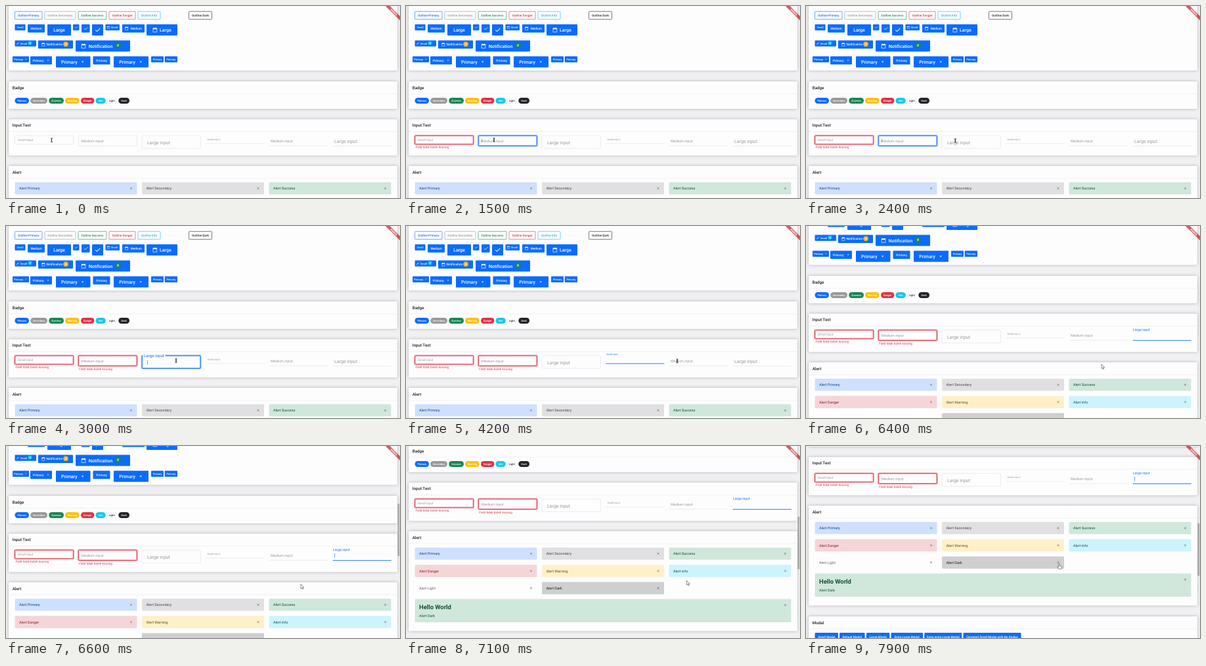
Animation of 600x293 px, one loop 8000 ms. Source, as an HTML page:

```html
<!DOCTYPE html>
<html lang="en">
<head>
<meta charset="utf-8">
<title>Component gallery</title>
<style>
html, body { margin: 0; width: 100%; height: 100%; overflow: hidden; background: #f0eff1; }
svg { display: block; width: 600px; height: 293px; font-family: Roboto, Arial, sans-serif; text-rendering: geometricPrecision; }
.card { fill: #fefdfe; filter: drop-shadow(0 0 2.2px rgba(0, 0, 0, .27)); }
</style>
</head>
<body>
<svg viewBox="0 0 600 293">
  <g id="page">
    <g id="top"></g>
    <g id="inputs"></g>
    <g id="below"></g>
  </g>
  <rect id="thumb" x="596.3" width="3" height="80" fill="#8c8c8c"/>
  <g transform="translate(600 0) rotate(45)">
    <rect x="-20" y="10.9" width="40" height="4.7" fill="#b71c1c" opacity=".7"/>
    <text y="14.7" font-size="4" font-weight="900" fill="#fff" text-anchor="middle">DEBUG</text>
  </g>
  <g id="pointer"></g>
</svg>
<script>
const $ = id => document.getElementById(id);
const BLUE = '#0a6cff', RED = '#dc3545', GREEN = '#198754';
const S = 3.9, M = 4.69, B = 5.47, L = 7.03; // font sizes

const text = (x, y, s, size, fill, extra = '') =>
  `<text x="${x}" y="${y}" font-size="${size}" fill="${fill}" ${extra}>${s}</text>`;
const rect = (x, y, w, h, fill, r = 1, extra = '') =>
  `<rect x="${x}" y="${y}" width="${w}" height="${h}" rx="${r}" fill="${fill}" ${extra}/>`;
const path = (d, stroke, width, extra = '') =>
  `<path d="${d}" fill="none" stroke="${stroke}" stroke-width="${width}" ${extra}/>`;
const MID = 'text-anchor="middle" font-weight="500"';

function card(y, h, title) {
  return `<rect class="card" x="4" y="${y}" width="592" height="${h}" rx="1.5"/>` + (title ?
    text(9.7, y + 11.5, title, 6.25, '#222', 'font-weight="500"') +
    path(`M4 ${y + 19}H596`, '#e2e1e3', .5) : '');
}

// Filled button; height follows the font size
const heights = { [S]: 9.3, [M]: 12.5, [L]: 17 };
function button(x0, x1, y, size, label, textX) {
  const h = heights[size], base = y + h / 2 + size * .36;
  return rect(x0, y, x1 - x0, h, BLUE) + (textX
    ? text(textX, base, label, size, '#fff', 'font-weight="500"')
    : text((x0 + x1) / 2, base, label, size, '#fff', MID));
}

const at = (x, y, k, body) => `<g transform="translate(${x} ${y}) scale(${k})">${body}</g>`;
const calendar = (x, y, k) => at(x, y, k,
  path('M-2.5-2h5V3h-5zM-1.5-3v1M1.5-3v1', '#fff', .6) + rect(-2.5, -2.2, 5, 1.4, '#fff', 0));
const check = (x, y, k) => at(x, y, k, path('M-2.6 0L-.8 1.8L2.8-1.8', '#fff', .8));
const pencil = (x, y) => path(`M${x - 1.5} ${y + 1.5}l3-3`, '#fff', 1);
const caretDown = (x, y, k) => at(x, y, k, '<path d="M-1.4-.7h2.8L0 .7z" fill="#fff"/>');
const dot = (x, y, r, fill) =>
  `<circle cx="${x}" cy="${y}" r="${r}" fill="${fill}"/>` + text(x, y + r * .4, '4', r * 1.2, '#fff', MID);

function buildTop() {
  let s = card(-20, 118.5);
  [['Primary', 13.5, 55, BLUE], ['Secondary', 59, 106, '#999'], ['Success', 110, 153, GREEN],
   ['Danger', 157, 197, RED], ['Info', 201, 235, '#17b8e8'], ['Light', 240, 273, '#f7f6f8'],
   ['Dark', 278.5, 313.5, '#212529']].forEach(([name, a, b, c]) => {
    s += rect(a, 8.3, b - a, 12, 'none', 1, `stroke="${c}" stroke-width=".6"`) +
      text((a + b) / 2, 16, 'Outline ' + name, M, c, MID);
  });
  s += button(13.5, 29.5, 28, S, 'Small') + button(33, 59, 28, M, 'Medium') + button(63, 99, 28, L, 'Large') +
    button(102, 111.5, 28, S, '') + check(106.8, 32.7, .75) +
    button(115, 127.6, 28, M, '') + check(121.3, 34.3, 1) +
    button(131, 148, 28, L, '') + check(139.5, 36.5, 1.3) +
    button(151.5, 173, 28, S, 'Small', 160) + calendar(156, 32.6, .65) +
    button(177, 211, 28, M, 'Medium', 189.7) + calendar(183.6, 34, .85) +
    button(214, 261, 28, L, 'Large', 234) + calendar(226.8, 36.3, 1.15);
  s += button(13.5, 46, 52.5, S, 'Small', 22) + pencil(18, 57.3) + dot(36.5, 56.5, 3, '#17c6f2') +
    button(49, 102, 52.5, M, 'Notification', 61.5) + calendar(56.8, 58.6, .85) + dot(91, 58.3, 3.8, '#ffb91a') +
    button(106, 189, 52.5, L, 'Notification', 125.7) + calendar(118, 60.8, 1.15) + dot(170.3, 60, 4.7, GREEN);
  s += button(10, 35, 76.8, S, 'Primary', 12.3) + caretDown(30.3, 81.3, .8) +
    button(37, 70, 76.8, M, 'Primary', 41) + caretDown(64, 83, 1) +
    button(76, 128.5, 76.8, L, 'Primary', 84) + caretDown(116.7, 85.5, 1.3) +
    button(132.5, 158.5, 76.8, M, 'Primary') +
    button(164, 217, 76.8, L, 'Primary', 172.3) + caretDown(205.2, 85.5, 1.3) +
    button(221, 240, 76.8, S, 'Primary') + button(241.7, 261, 76.8, S, 'Primary');
  s += card(115, 42, 'Badge');
  [['Primary', 13.5, 35, BLUE], ['Secondary', 37.3, 63, '#999'], ['Success', 65.2, 88, GREEN],
   ['Warning', 90, 111.7, '#ffc107'], ['Danger', 114, 134.5, RED], ['Info', 136.5, 151.7, '#17c6f2'],
   ['Light', 153.8, 169, '#f8f8f9'], ['Dark', 171.3, 188, '#212529']].forEach(([name, a, b, c]) => {
    s += rect(a, 140, b - a, 9, c, 4.5) +
      text((a + b) / 2, 146, name, S, name === 'Light' ? '#333' : '#fff', MID);
  });
  return s;
}

const cross = (x, y) => path(`M${x - 1.3} ${y - 1.3}l2.6 2.6m0-2.6l-2.6 2.6`, '#444', .6);

function buildBelow() {
  let s = card(247, 152.5, 'Alert');
  [['Primary', '#cfe0fe', '#084298'], ['Secondary', '#e0e0e2', '#41464b'], ['Success', '#d0e7dc', '#0f5132'],
   ['Danger', '#f5d5d8', '#842029'], ['Warning', '#fff0ca', '#664d03'], ['Info', '#cdf3fd', '#055160'],
   ['Light', '#fefdfe', '#636464'], ['Dark', '#cfcfcf', '#141619']].forEach(([name, bg, fg], i) => {
    const x = 13.5 + i % 3 * 193.5, y = 272 + Math.floor(i / 3) * 26.3;
    s += rect(x, y, 186, 18.6, bg, 1.5) + text(x + 6.4, y + 11.3, 'Alert ' + name, B, fg) + cross(x + 177, y + 9.3);
  });
  s += rect(13.5, 350.6, 573, 35.4, '#d0e7dc', 1.5) +
    text(20, 365.7, 'Hello World', 9.38, '#0f5132', 'font-weight="600"') +
    text(20, 378.4, 'Alert Dark', B, '#0f5132') + cross(577.5, 359.7);
  s += card(416, 60, 'Modal');
  [['Small Modal', 13.5, 49], ['Default Modal', 51, 89.5], ['Large Modal', 92, 127.3],
   ['Extra Large Modal', 129.5, 178], ['Extra extra Large Modal', 180.3, 237.3],
   ['Centered Small Modal with No Radius', 239.5, 327.5]].forEach(([name, a, b]) => {
    s += button(a, b, 441, M, name);
  });
  return s;
}

// Inputs: label, size, text x, baseline, bottom, then the floated label's x, baseline, size
const fields = [
  ['Small input', M, 18, 206.2, 211],
  ['Medium input', B, 115, 207.7, 213.5],
  ['Large input', L, 215, 210.7, 217.3, 210, 200, 6.2],
  ['Small input', S, 306.5, 205.4, 210, 305, 197.3, 3.5],
  ['Medium input', B, 403, 208.3, 213.3, 401.5, 198.3, 4.8],
  ['Large input', L, 500, 208.7, 213.7, 498, 198.6, 5.15]
];
const focusAt = [300, 1100, 2650, 3600, 4400, 5580, Infinity];

function ramp(t, start, dur = 200) {
  const u = Math.max(0, Math.min(1, (t - start) / dur));
  return u * u * (3 - 2 * u);
}
const mix = (a, b, u) => a + (b - a) * u;

function field([label, size, tx, base, bottom, fx = tx, fy = base, fs = size], i, t) {
  const x = 13.5 + 96.75 * i, start = focusAt[i], end = focusAt[i + 1];
  const active = t >= start && t < end, failed = i < 2 && t >= end;
  const up = ramp(t, start) - ramp(t, end);
  const color = active ? BLUE : failed ? RED : '#d8d7d9';
  let s = '';
  if (i < 3) {
    const box = (w, o) => rect(x, 197.8, 89.2, bottom - 197.8, 'none', 1, `stroke="${color}" stroke-width="${w}" opacity="${o}"`);
    if (active || failed) s += box(2.6, .35);
    s += box(active || failed ? .9 : .5, 1);
    if (i === 2 && up > 0) s += rect(208.5, 196, 34 * up, 3.6, '#fefdfe', 0);
  } else {
    s += path(`M${x + .5} ${bottom}h89`, color, active ? .9 : .5);
  }
  s += text(mix(tx, fx, up), mix(base, fy, up), label, mix(size, fs, up), i > 1 && up > .5 ? BLUE : '#999');
  if (active && (t - start) % 1000 < 500)
    s += path(`M${tx + .5} ${base - size * .8}v${size * .9}`, BLUE, .7);
  if (failed)
    s += text(x + 1, bottom + 6.4, 'Field tidak boleh kosong', M, RED, `opacity="${ramp(t, end)}"`);
  return s;
}

// Pointer track: time, x, y
const track = [
  [0, 69.5, 204.7], [700, 69.5, 204.7], [1080, 126, 205], [1500, 134, 204.3], [1750, 134, 204.3],
  [1800, 135, 203.5], [1950, 135, 203.5], [2600, 254, 206], [3000, 259, 205.5], [3400, 335, 204.5],
  [3600, 335, 204.5], [4200, 413, 206], [4750, 413, 206], [5500, 510, 211], [5700, 511.5, 211],
  [6300, 450.5, 211], [6400, 450, 211], [6600, 449, 211], [7100, 427.5, 205.5], [7500, 410, 198],
  [7850, 385.5, 180], [8000, 385.5, 180]
];
function pointerAt(t) {
  const i = track.findIndex(k => k[0] > t), [a, x0, y0] = track[i - 1], [b, x1, y1] = track[i];
  const u = ramp(t, a, b - a);
  return [mix(x0, x1, u), mix(y0, y1, u)];
}
const beam = path('M-1.4-3q1.4 0 1.4 1V2q0 1-1.4 1M1.4-3Q0-3 0-2V2q0 1 1.4 1', '#111', .8);
const arrow = '<path d="M0 0v6.6l1.6-1.4 1.1 2.4 1-.4-1.1-2.4h2.2z" fill="#fff" stroke="#222" stroke-width=".5"/>';
const hand = '<path d="M-.7.4q.7-1 1.4 0v2.5l2.8.8q.7.2.5 1L3.4 7.8H-.6L-2.7 4.6q0-1 1-.7l1 .9z" fill="#fff" stroke="#222" stroke-width=".5"/>';

const wheel = [6350, 6650, 7000, 7350];

function draw(t) {
  const scroll = 39 * wheel.filter(w => t >= w).length;
  const grow = 3 * ramp(t, focusAt[2]);
  $('page').setAttribute('transform', `translate(0 ${-scroll})`);
  $('inputs').innerHTML = card(172.7, 55.5 + grow, 'Input Text') + fields.map((f, i) => field(f, i, t)).join('');
  $('below').setAttribute('transform', `translate(0 ${grow - 3})`);
  $('thumb').setAttribute('y', 78 + scroll * .256);
  $('thumb').setAttribute('opacity', .65 * ramp(t, wheel[0], 300));

  const [x, y] = pointerAt(t), py = y + scroll;
  const overInput = py > 197 && py < 216 && (x - 13.5) % 96.75 < 89.5;
  const overCross = Math.abs(x - 384) < 5 && Math.abs(py - 334) < 5;
  $('pointer').setAttribute('transform', `translate(${x} ${y})`);
  $('pointer').innerHTML = overInput ? beam : overCross ? hand : arrow;
}

$('top').innerHTML = buildTop();
$('below').innerHTML = buildBelow();
const begin = performance.now();
function tick() {
  draw((performance.now() - begin) % 8000);
  requestAnimationFrame(tick);
}
tick();
</script>
</body>
</html>
```
